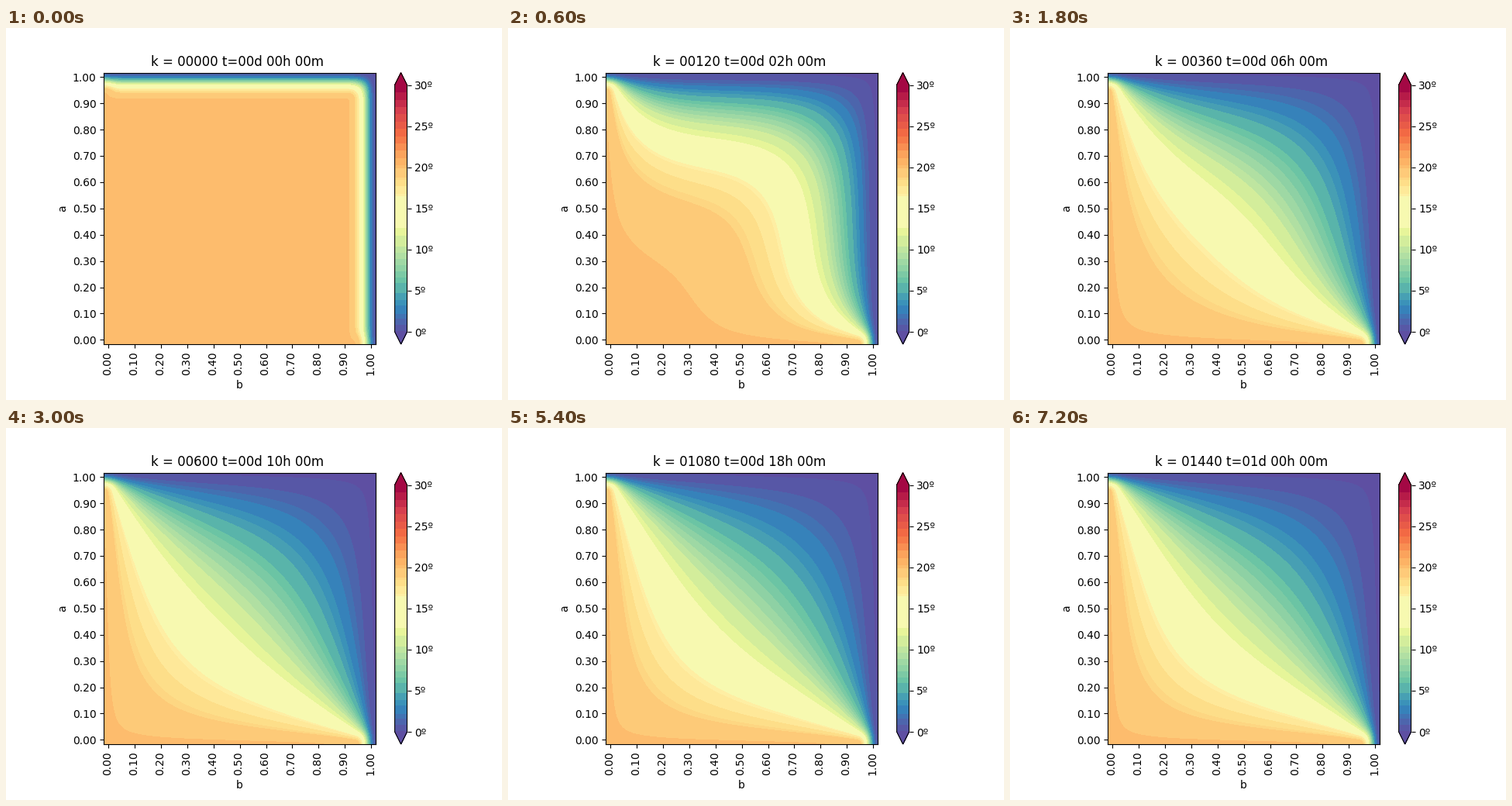
Animation of 640x480 px, one loop 7350 ms. Source, as a matplotlib script:

```python
import matplotlib.pyplot as plt
import numpy as np
from matplotlib.animation import FuncAnimation
from matplotlib.colors import ListedColormap
from matplotlib.transforms import Affine2D

FRAMES, INTERVAL = 49, 150
STEPS = 30            # one-minute steps per frame
N = 31                # grid nodes per side
FO = 0.25             # Fourier number, alpha * dt / dx**2
HOT, COLD, TOP = 20.0, 0.0, 30.0


def simulate():
    """Explicit heat conduction; warm left and bottom, cold top and right."""
    temp = np.full((N, N), HOT)
    temp[-1, :] = temp[:, -1] = COLD
    fields = []
    for k in range((FRAMES - 1) * STEPS + 1):
        mid = temp[1:-1, 1:-1]
        around = temp[2:, 1:-1] + temp[:-2, 1:-1] + temp[1:-1, 2:] + temp[1:-1, :-2]
        temp[1:-1, 1:-1] = mid + FO * (around - 4 * mid)
        if k % STEPS == 0:
            fields.append(temp.copy())
    return fields


def banded_cmap(bins=600):
    """Spectral colours in flat bands, with one wide pale yellow band."""
    edges = np.concatenate([
        [0, 0.12, 0.9, 1.6, 2.2, 3.2, 3.9, 4.7, 5.9], np.linspace(6.6, 10.4, 6),
        [11.7, 12.65, 16.45, 16.75, 17.7, 18.45, 18.75, 19.92, 20.3],
        np.linspace(21.1, TOP, 11)])
    centres = (edges[:-1] + edges[1:]) / 2
    colors = plt.get_cmap("Spectral_r")(centres / TOP)
    colors[np.searchsorted(edges, 15) - 1, :3] = np.array([247, 249, 176]) / 255
    values = (np.arange(bins) + 0.5) * TOP / bins
    return ListedColormap(colors[np.searchsorted(edges, values) - 1])


def title(k):
    return f"k = {k:05d} t={k // 1440:02d}d {k // 60 % 24:02d}h {k % 60:02d}m "


fields = simulate()
fig, ax = plt.subplots(figsize=(6.4, 4.8), dpi=100)
fig.subplots_adjust(left=0.125, right=0.9, bottom=0.15, top=0.88)

half = 0.5 / (N - 1)
image = ax.imshow(fields[0], origin="lower", cmap=banded_cmap(), vmin=0, vmax=TOP,
                  extent=(-half, 1 + half, -half, 1 + half),
                  interpolation="bicubic", interpolation_stage="data")
bar = fig.colorbar(image, ax=ax, extend="both", aspect=22, ticks=range(0, 31, 5))
bar.ax.set_yticklabels([f"{v}º" for v in range(0, 31, 5)])

ticks = np.linspace(0, 1, 11)
labels = [f"{t:.2f}" for t in ticks]
ax.set_xticks(ticks, labels, rotation=90)
ax.set_yticks(ticks, labels)
for label in ax.get_xticklabels():
    label.set_transform(label.get_transform() + Affine2D().translate(-1, 0))
ax.set_xlabel("b")
ax.set_ylabel("a")
heading = ax.set_title(title(0))


def update(i):
    image.set_data(fields[i])
    heading.set_text(title(i * STEPS))
    return image, heading


anim = FuncAnimation(fig, update, frames=FRAMES, interval=INTERVAL,
                     repeat=True, repeat_delay=0, blit=False)
plt.show()
```
